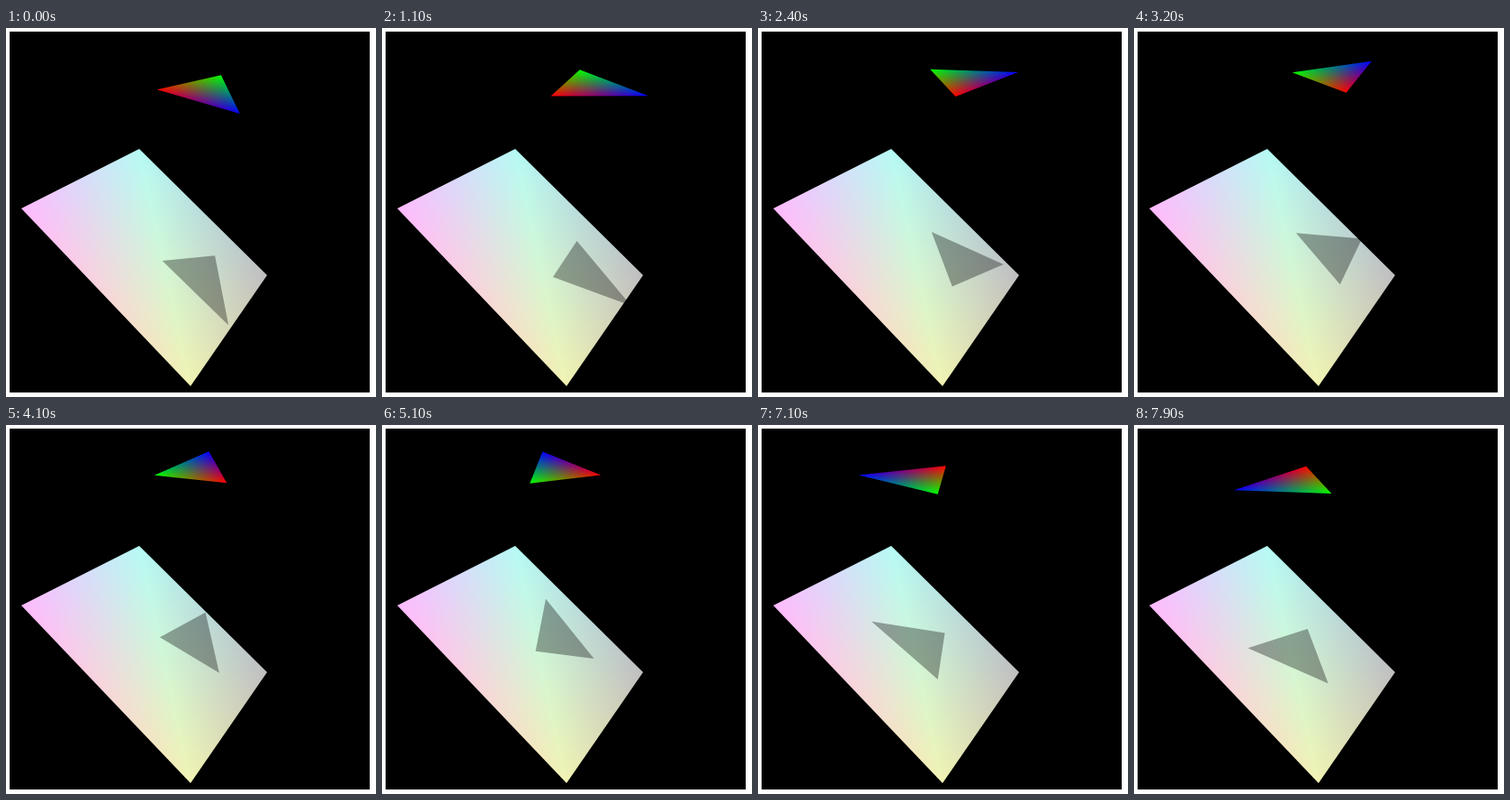
These frames come from a looping animation (411x409 px, 8 s). An HTML page with a canvas:

```html
<!DOCTYPE html>
<html>
<head>
<meta charset="utf-8">
<style>
html, body { margin: 0; width: 100%; height: 100%; overflow: hidden; background: #fff; }
canvas { display: block; }
</style>
</head>
<body>
<canvas id="stage" width="411" height="409"></canvas>
<script>
const ctx = document.getElementById('stage').getContext('2d');
const LOOP = 8000, STEP = 100, TURN = 11000;
const APEX = 1 / 0.4405; // apex distance, relative to half the base

// Perspective views of the turning plane: center, axis images, depth factors
const OBJECT = { center: [204.5, 60], u: [-35.5, 8], v: [21.6, 13.7], depth: [0.033, 0.05] };
const SHADOW = { center: [203.8, 255], u: [-29.2, 2.8], v: [17.6, 30.2], depth: [0.033, 0.035] };

const TOP = [148, 134], LEFT = [17, 200], BOTTOM = [205, 397], RIGHT = [290, 274];
const CYAN = [182, 250, 245], PINK = [255, 185, 255], YELLOW = [240, 243, 178], GREY = [192, 190, 192];

function project(view, radius, angle) {
  const c = radius * Math.cos(angle), s = radius * Math.sin(angle);
  const w = 1 - view.depth[0] * c - view.depth[1] * s;
  return [0, 1].map(i => view.center[i] + (view.u[i] * c + view.v[i] * s) / w);
}

function corners(view, angle) {
  return [
    project(view, 1, angle),
    project(view, -1, angle),
    project(view, APEX, angle + Math.PI / 2)
  ];
}

function trace(points) {
  ctx.beginPath();
  points.forEach(p => ctx.lineTo(...p));
  ctx.closePath();
}

// Adds one gradient per corner, fading to black at the opposite edge
function shade(points, colors) {
  ctx.globalCompositeOperation = 'lighter';
  trace(points);
  points.forEach((p, i) => {
    const a = points[(i + 1) % 3], b = points[(i + 2) % 3];
    const dx = b[0] - a[0], dy = b[1] - a[1];
    const k = ((p[0] - a[0]) * dx + (p[1] - a[1]) * dy) / (dx * dx + dy * dy);
    const fade = ctx.createLinearGradient(...p, a[0] + k * dx, a[1] + k * dy);
    fade.addColorStop(0, `rgb(${colors[i]})`);
    fade.addColorStop(1, '#000');
    ctx.fillStyle = fade;
    ctx.fill();
  });
  ctx.globalCompositeOperation = 'source-over';
}

function draw(time) {
  const angle = 2 * Math.PI * time / TURN;
  ctx.fillStyle = '#fff';
  ctx.fillRect(0, 0, 411, 409);
  ctx.fillStyle = '#000';
  ctx.fillRect(4, 4, 400, 400);

  shade([TOP, LEFT, BOTTOM], [CYAN, PINK, YELLOW]);
  shade([TOP, RIGHT, BOTTOM], [CYAN, GREY, YELLOW]);

  trace(corners(SHADOW, angle));
  ctx.fillStyle = 'rgba(0, 0, 0, 0.34)';
  ctx.fill();

  shade(corners(OBJECT, angle), [[255, 0, 0], [0, 255, 0], [0, 0, 255]]);
}

const start = performance.now();
function tick() {
  const time = (performance.now() - start) % LOOP;
  draw(Math.floor(time / STEP) * STEP);
  requestAnimationFrame(tick);
}
tick();
</script>
</body>
</html>
```
